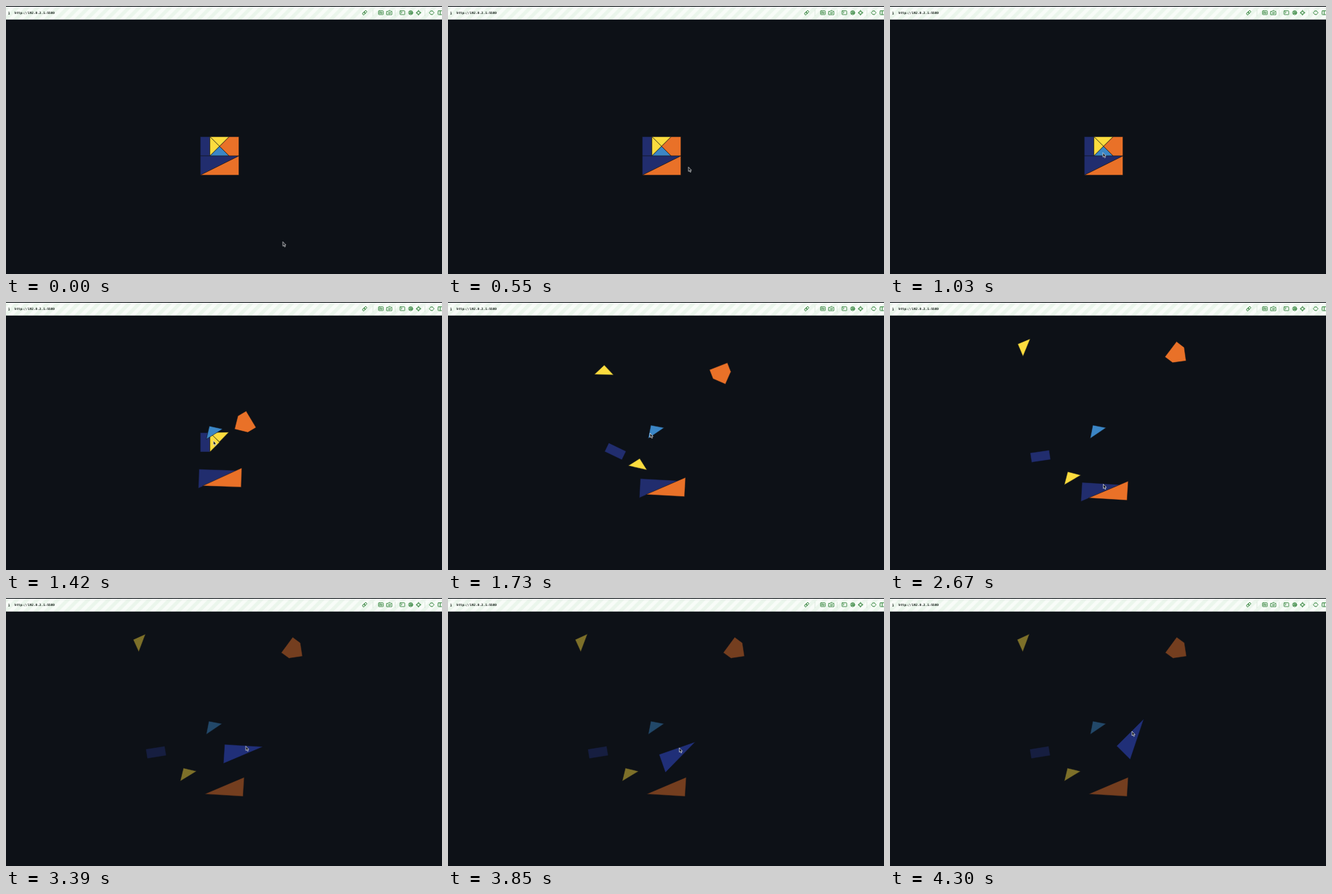
Animation, 600 px wide and 370 px high, one loop 4330 ms. Source, as an HTML page:

```html
<!DOCTYPE html>
<html lang="en">
<head>
<meta charset="utf-8">
<title>Tangram</title>
<style>
  html, body { margin: 0; width: 100%; height: 100%; overflow: hidden; background: #0d1117; }
  svg { display: block; width: 600px; height: 370px; }
  .url { font: bold 4.4px "DejaVu Sans Mono", monospace; fill: #16201a; }
  .icons { fill: none; stroke: #3c8a45; stroke-width: .9; stroke-linejoin: round; stroke-linecap: round; }
  .rules { stroke: #cfdfd0; stroke-width: .6; }
</style>
</head>
<body>
<svg viewBox="0 0 600 370">
  <defs>
    <pattern id="stripes" width="14" height="19" patternUnits="userSpaceOnUse" patternTransform="skewX(-45)">
      <rect width="14" height="19" fill="#f8fcf8"/>
      <rect width="7" height="19" fill="#ebf6ec"/>
    </pattern>
  </defs>
  <rect width="600" height="370" fill="#0d1117"/>
  <rect width="600" height="18.7" fill="url(#stripes)"/>
  <rect width="600" height="1" fill="#0d1117"/>
  <path d="M3.4 8.7H4.3V11.2M3.2 11.2H5.2M4.1 7V7.3" fill="none" stroke="#26352a" stroke-width=".8"/>
  <text class="url" x="11.5" y="10.9">http://192.0.2.1:5500</text>
  <path class="rules" d="M505 5V14M535.5 5V14M576.5 5V14"/>
  <g class="icons">
    <g transform="rotate(-45 493.5 9.3)">
      <rect x="490" y="7.9" width="4.2" height="2.8" rx="1.4"/>
      <rect x="492.8" y="7.9" width="4.2" height="2.8" rx="1.4"/>
    </g>
    <rect x="512.7" y="6.7" width="6.6" height="5.2" rx=".6"/>
    <path d="M514.2 10.6V8.3H516V10.6M517.4 8.4V10.4"/>
    <path d="M524.2 7.4H526L526.8 6.3H528.6L529.4 7.4H531V12H524.2Z"/>
    <circle cx="527.6" cy="9.6" r="1.2"/>
    <rect x="542.2" y="6.7" width="6.6" height="5.2" rx=".6"/>
    <path d="M543.7 8.2H544.4M543.7 10.2L545 9"/>
    <circle cx="557" cy="9.3" r="2.8"/>
    <circle cx="557" cy="9.3" r="1.1"/>
    <path d="M555 8H559M555 10.6H559"/>
    <circle cx="567.7" cy="9.3" r="2.3"/>
    <path d="M567.7 6V7.8M567.7 10.8V12.6M564.4 9.3H566.2M569.2 9.3H571"/>
    <path d="M584.8 6.9L582.3 9.3L584.8 11.7M586.8 6.9L589.3 9.3L586.8 11.7M584.8 6.9H586.8M584.8 11.7H586.8"/>
    <rect x="594.6" y="6.7" width="6.6" height="5.2" rx=".6"/>
    <path d="M597.5 6.7V11.9"/>
  </g>
  <g id="board" stroke="#0d1117" stroke-width=".5"></g>
  <path id="cursor" d="M0 0V6L1.4 4.9L2.4 7.1L3.4 6.7L2.5 4.5H4.2Z" fill="#11151b" stroke="#fff" stroke-width=".6"/>
</svg>
<script>
const LOOP = 4330;
const UNIT = 13.3, LEFT = 267.3, TOP = 180.4;
const GRAB = 2850, DIM = 0.47;
const NAVY = '#212d6e', YELLOW = '#fcdc3e', ORANGE = '#e97128', BLUE = '#3b86c6';

// pts: corners in board units; to: final centre; turn: degrees; start, tau: scatter timing in ms
const pieces = [
  { pts: [[0, 0], [1, 0], [1, 2], [0, 2]], color: NAVY, to: [206.4, 213.1], turn: -99.1, start: 1473, tau: 248 },
  { pts: [[1, 0], [3, 0], [2, 1]], color: YELLOW, to: [183.2, 60.5], turn: -249.4, start: 1420, tau: 248 },
  { pts: [[1, 0], [2, 1], [1, 2]], color: YELLOW, to: [248.7, 242.3], turn: -121.5, start: 1480, tau: 248 },
  { pts: [[2, 1], [3, 2], [1, 2]], color: BLUE, to: [284, 177.3], turn: -34, start: 1130, tau: 100 },
  { pts: [[3, 0], [4, 0], [4, 2], [3, 2], [2, 1]], color: ORANGE, to: [395.2, 71], turn: -143.6, start: 1361, tau: 248 },
  { pts: [[0, 2], [4, 2], [0, 4]], color: NAVY, to: [281.4, 259], turn: 3.5, start: 1215, tau: 248, held: true },
  { pts: [[4, 2], [4, 4], [0, 4]], color: ORANGE, to: [309.1, 264], turn: 3.5, start: 1225, tau: 248 }
];

// time, x, y
const pointer = [
  [30, 381, 325.5], [150, 355, 235], [330, 355, 235], [850, 293, 202.5], [1100, 293, 202.5],
  [1730, 278, 181], [2180, 290, 259.5], [2670, 293.5, 251.5], [3030, 293.5, 251.5],
  [3390, 330, 204.5], [3580, 319, 220.5], [4120, 317.6, 193.4], [4300, 333, 184]
];

const board = document.getElementById('board');
const cursor = document.getElementById('cursor');

const lerp = (a, b, p) => a + (b - a) * p;
const ramp = (t, from, to) => Math.min(1, Math.max(0, (t - from) / (to - from)));
const smooth = p => p * p * (3 - 2 * p);
const settle = (t, start, tau) => t < start ? 0 : 1 - Math.exp((start - t) / tau);
const mean = (pts, axis) => pts.reduce((sum, pt) => sum + pt[axis], 0) / pts.length;

function pointerAt(t) {
  const next = pointer.findIndex(key => key[0] > t);
  if (next === 0) return pointer[0].slice(1);
  if (next < 0) return pointer[pointer.length - 1].slice(1);
  const a = pointer[next - 1], b = pointer[next];
  const p = smooth(ramp(t, a[0], b[0]));
  return [lerp(a[1], b[1], p), lerp(a[2], b[2], p)];
}

for (const piece of pieces) {
  const cx = mean(piece.pts, 0), cy = mean(piece.pts, 1);
  piece.home = [LEFT + cx * UNIT, TOP + cy * UNIT];
  piece.el = document.createElementNS('http://www.w3.org/2000/svg', 'polygon');
  piece.el.setAttribute('points', piece.pts.map(([x, y]) => [(x - cx) * UNIT, (y - cy) * UNIT]).join(' '));
  piece.el.setAttribute('fill', piece.color);
  board.append(piece.el);
}
const heldPiece = pieces.find(piece => piece.held);

// The held piece hangs from the point where it was picked up.
function dragPose(t, [px, py]) {
  const [gx, gy] = pointerAt(GRAB);
  const turn = -48.5 * smooth(ramp(t, 3640, 4080));
  const a = turn * Math.PI / 180, c = Math.cos(a), s = Math.sin(a);
  const dx = heldPiece.to[0] - gx, dy = heldPiece.to[1] - gy;
  return [px + dx * c - dy * s, py + dx * s + dy * c, heldPiece.turn + turn];
}

function scatterPose({ home, to, turn, start, tau }, t) {
  const p = settle(t, start, tau);
  return [lerp(home[0], to[0], p), lerp(home[1], to[1], p), turn * p];
}

function render(t) {
  const point = pointerAt(t);
  const dragging = t >= GRAB;
  const dim = lerp(1, DIM, ramp(t, GRAB, GRAB + 150));
  for (const piece of pieces) {
    const [x, y, turn] = piece.held && dragging ? dragPose(t, point) : scatterPose(piece, t);
    piece.el.setAttribute('transform', `translate(${x} ${y}) rotate(${turn})`);
    piece.el.setAttribute('opacity', piece.held ? 1 : dim);
  }
  heldPiece.el.setAttribute('fill', dragging ? '#202f78' : NAVY);
  cursor.setAttribute('transform', `translate(${point[0]} ${point[1]})`);
}

const began = performance.now();
function tick() {
  render((performance.now() - began) % LOOP);
  requestAnimationFrame(tick);
}
tick();
</script>
</body>
</html>
```
